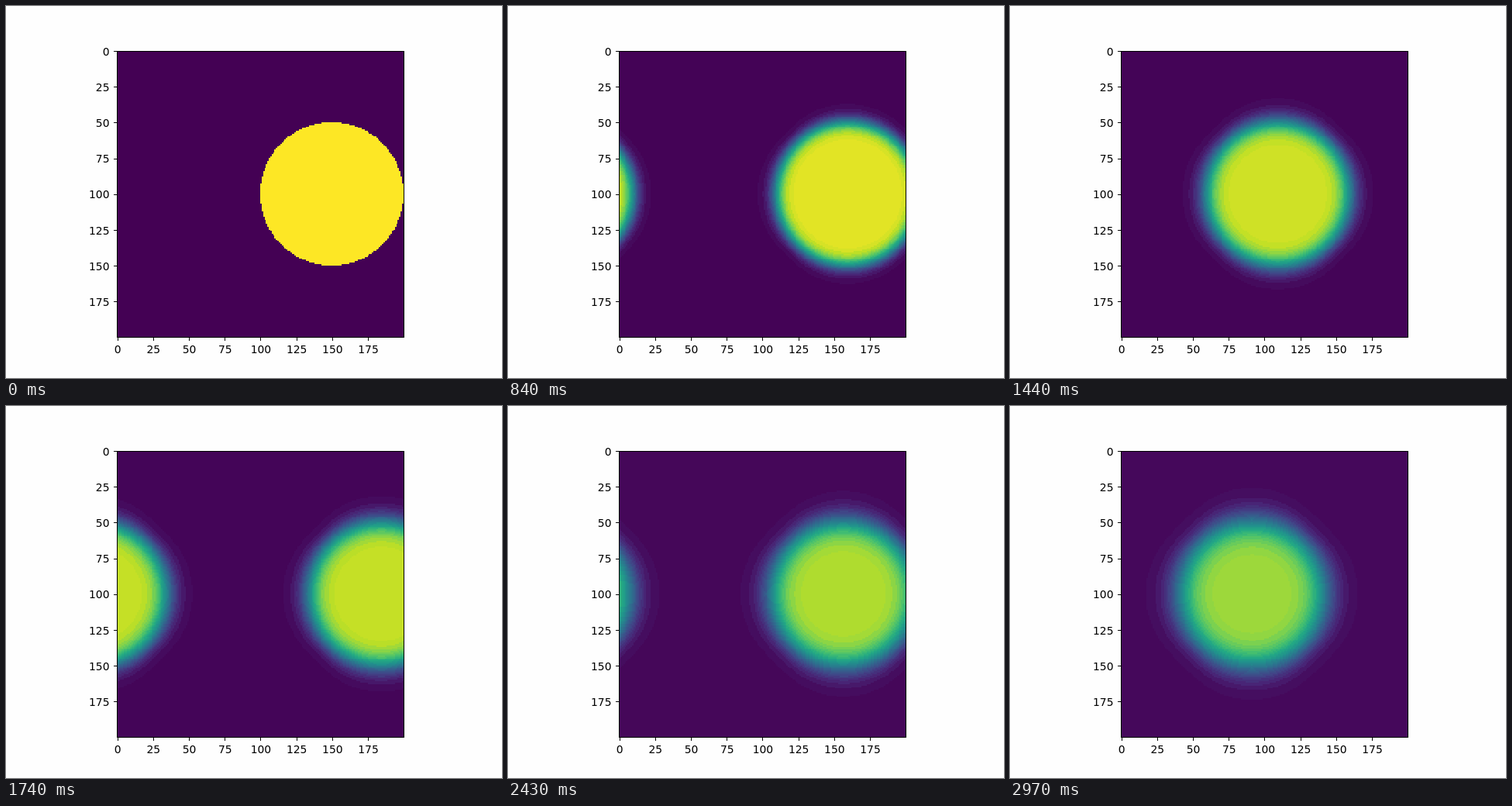
Animation of 640x480 px, one loop 3 s. Source, as an HTML page with a canvas:

```html
<!DOCTYPE html>
<html>
<head>
<meta charset="utf-8">
<style>
html, body { margin: 0; width: 100%; height: 100%; overflow: hidden; background: #fefefe; }
canvas { display: block; }
</style>
</head>
<body>
<canvas id="stage" width="640" height="480"></canvas>
<script>
const N = 200, R = 50, STEP = 30, STEPS = 100;
const LEFT = 143.2, TOP = 57.6, SIZE = 369.6, CELL = SIZE / N;
const ctx = document.getElementById('stage').getContext('2d');
const grid = document.createElement('canvas');
grid.width = grid.height = N;
const gridCtx = grid.getContext('2d');
const image = gridCtx.createImageData(N, N);

const stops = [
  [68, 1, 84], [72, 36, 117], [65, 68, 135], [53, 95, 141], [42, 120, 142], [33, 145, 140],
  [34, 168, 132], [68, 191, 112], [122, 209, 81], [189, 223, 38], [253, 231, 37]
];

function color(v) {
  const s = Math.max(0, Math.min(1, v)) * 10, i = Math.min(9, Math.floor(s));
  return stops[i].map((c, k) => c + (stops[i + 1][k] - c) * (s - i));
}

// Signed distance to the disc, flattened along the diagonals outside it
function distance(x, y) {
  const round = Math.hypot(x, y) - R;
  if (round <= 0) return round;
  const lo = Math.min(x, y), hi = Math.max(x, y), corner = R * Math.SQRT1_2;
  const taxi = lo < corner ? hi - Math.sqrt(R * R - lo * lo) : x + y - 2 * corner;
  return (round + taxi) / 2;
}

// Normal tail probability
function tail(z) {
  const a = Math.abs(z), t = 1 / (1 + 0.2316419 * a);
  const p = 0.39894228 * Math.exp(-a * a / 2) * t *
    (0.31938153 + t * (-0.356563782 + t * (1.781477937 + t * (-1.821255978 + t * 1.330274429))));
  return z < 0 ? 1 - p : p;
}

function band(u) {
  if (u < 0.008) return 0;
  if (u > 0.988) return 1;
  return (Math.floor(u * 25) + 0.5) / 25;
}

function drawField(n) {
  const cx = (149.5 + 7.49 * n) % N, cy = 99.5;
  const sigma = Math.sqrt(n), low = 0.0002 * n, high = 1 - 0.0015 * n;
  const cache = new Map();
  const shade = u => {
    if (!cache.has(u)) cache.set(u, color(low + (high - low) * u));
    return cache.get(u);
  };
  for (let y = 0, k = 0; y < N; y++) {
    for (let x = 0; x < N; x++, k += 4) {
      const dx = Math.abs(x - cx);
      const d = distance(Math.min(dx, N - dx), Math.abs(y - cy));
      const u = n ? band(tail(d / sigma)) : +(d <= 0);
      image.data.set(shade(u), k);
      image.data[k + 3] = 255;
    }
  }
  gridCtx.putImageData(image, 0, 0);
  ctx.save();
  ctx.beginPath();
  ctx.rect(143, 58, 371, 370);
  ctx.clip();
  ctx.imageSmoothingEnabled = false;
  ctx.drawImage(grid, LEFT, TOP, SIZE, SIZE);
  ctx.restore();
}

function drawAxes() {
  ctx.fillStyle = '#000';
  ctx.fillRect(143, 58, 371, 1);
  ctx.fillRect(143, 427, 371, 1);
  ctx.fillRect(143, 58, 1, 370);
  ctx.fillRect(513, 58, 1, 370);
  ctx.font = '13.89px "DejaVu Sans", sans-serif';
  for (let v = 0; v < N; v += 25) {
    const offset = (v + 0.5) * CELL;
    const x = LEFT + offset, y = TOP + offset;
    ctx.fillRect(Math.floor(x), 428, 1, 4);
    ctx.fillRect(139, Math.floor(y), 4, 1);
    ctx.textAlign = 'center';
    ctx.fillText(v, x, 448);
    ctx.textAlign = 'right';
    ctx.fillText(v, 133.5, Math.round(y + 5));
  }
}

let shown = -1;
function frame() {
  const n = Math.floor(performance.now() / STEP) % STEPS;
  if (n !== shown) {
    shown = n;
    ctx.fillStyle = '#fefefe';
    ctx.fillRect(0, 0, 640, 480);
    drawField(n);
    drawAxes();
  }
  requestAnimationFrame(frame);
}
frame();
</script>
</body>
</html>
```
